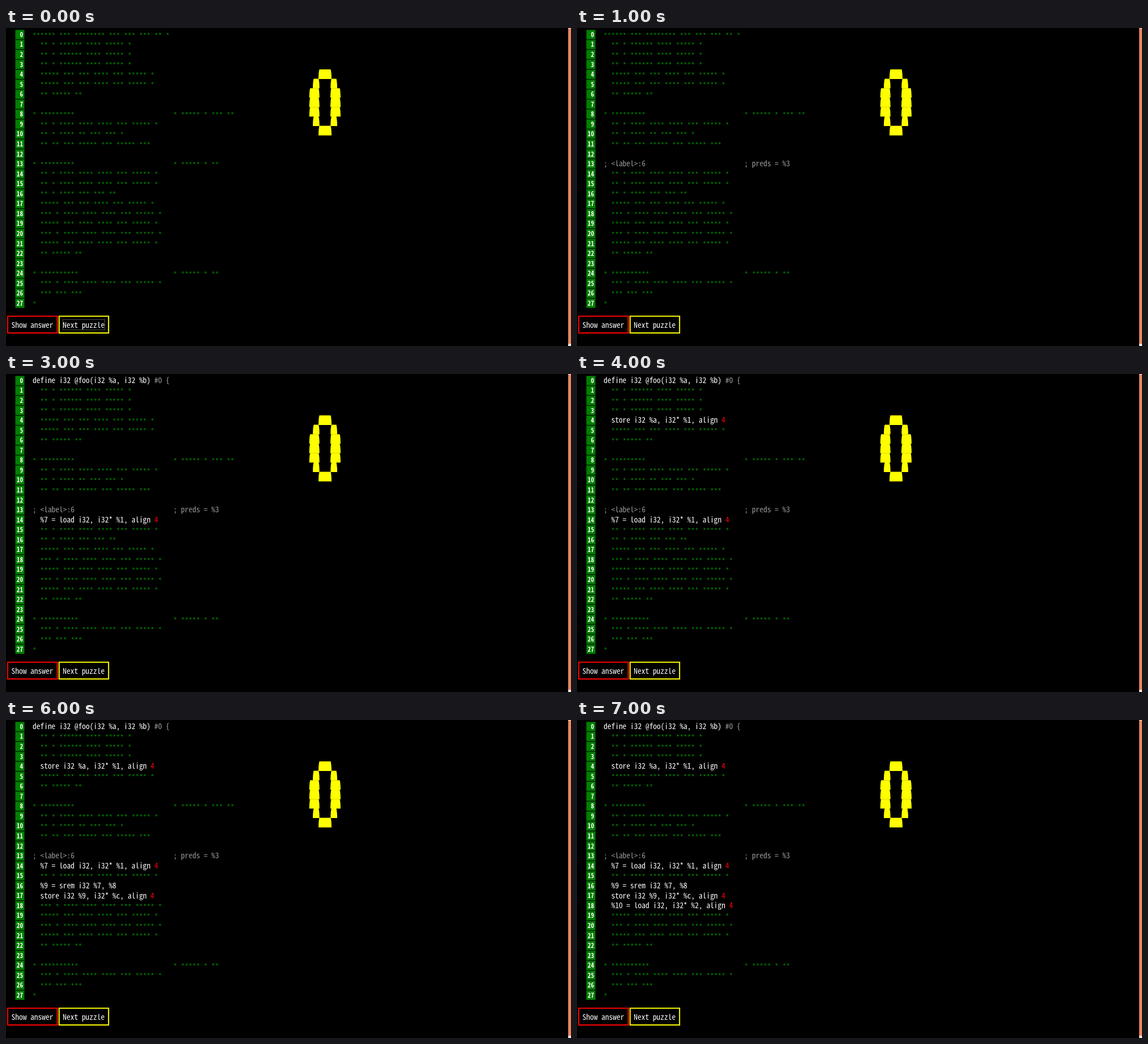
An HTML page with a canvas that plays this animation: 998 px wide and 561 px high, repeating every 8000 ms.

```html
<!DOCTYPE html>
<html lang="en">
<head>
<meta charset="utf-8">
<style>
  html, body { margin: 0; height: 100%; overflow: hidden; background: #000; }
  canvas { display: block; }
</style>
</head>
<body>
<canvas width="998" height="561"></canvas>
<script>
const ctx = document.querySelector('canvas').getContext('2d');
const LOOP = 8000, LEFT = 47, PITCH = 6.72, ROW = 17.556, FIRST = 11.5;
const FAMILY = '"Noto Sans Mono CJK JP", "Noto Sans Mono CJK SC", "Noto Sans Mono", monospace';

const label = (id, preds) => `; <label>:${id}`.padEnd(37) + `; preds = ${preds}`;
const load = (to, from) => `  %${to} = load i32, i32* %${from}, align 4`;
const store = (from, to) => `  store i32 %${from}, i32* %${to}, align 4`;
const alloca = name => `  %${name} = alloca i32, align 4`;

const lines = [
  'define i32 @foo(i32 %a, i32 %b) #0 {',
  alloca(1), alloca(2), alloca('c'), store('a', 1), store('b', 2), '  br label %3', '',
  label(3, '%6, %0'), load(4, 2), '  %5 = icmp ne i32 %4, 0', '  br i1 %5, label %6, label %12', '',
  label(6, '%3'), load(7, 1), load(8, 2), '  %9 = srem i32 %7, %8', store(9, 'c'),
  load(10, 2), store(10, 1), load(11, 'c'), store(11, 2), '  br label %3', '',
  label(12, '%3'), load(13, 1), '  ret i32 %13', '}'
];

// Line number -> time at which it is uncovered
const reveal = { 13: 1000, 14: 2000, 0: 3000, 4: 4000, 17: 5000, 16: 6000, 18: 7000 };

// Font size follows from the wanted character pitch
function fontFor(pitch, weight = 400) {
  ctx.font = `${weight} 100px ${FAMILY}`;
  const size = pitch / ctx.measureText('0').width * 100;
  return `${weight} ${size}px ${FAMILY}`;
}
const codeFont = fontFor(PITCH), buttonFont = fontFor(PITCH, 500), numberFont = fontFor(5.6, 700);

function text(str, x, y, color, font) {
  ctx.font = font;
  ctx.fillStyle = color;
  ctx.fillText(str, x, y);
}

function rect(x, y, w, h, color) {
  ctx.fillStyle = color;
  ctx.fillRect(x, y, w, h);
}

function outline(x, y, w, h, color, width, dash = []) {
  ctx.strokeStyle = color;
  ctx.lineWidth = width;
  ctx.setLineDash(dash);
  ctx.strokeRect(x, y, w, h);
  ctx.setLineDash([]);
}

function drawNumber(n, y) {
  rect(16, y - 8.5, 17, 17, '#008000');
  outline(16.5, y - 8.2, 16, 16.6, '#000', 1, [1.3, 1.3]);
  ctx.textAlign = 'right';
  text(n, 30, y + 4.4, '#fff', numberFont);
  ctx.textAlign = 'left';
}

function drawStars(line, y) {
  ctx.font = codeFont;
  const m = ctx.measureText('*');
  const base = y - 1.5 + (m.actualBoundingBoxAscent - m.actualBoundingBoxDescent) / 2;
  text(line.replace(/\S/g, '*'), LEFT, base, '#008000', codeFont);
}

function drawCode(line, y) {
  const tail = line.match(/#0 \{$|4$/);
  const cut = tail ? tail.index : line.length;
  text(line.slice(0, cut), LEFT, y + 4.7, line[0] === ';' ? '#999' : '#fff', codeFont);
  if (tail) text(tail[0], LEFT + cut * PITCH, y + 4.7, tail[0] === '4' ? '#f00' : '#aaa', codeFont);
}

function drawBlock(x, y, w) {
  ctx.beginPath();
  ctx.moveTo(x + 1.5, y);
  ctx.quadraticCurveTo(x, y + 6, x, y + 16.9);
  ctx.lineTo(x + w, y + 16.9);
  ctx.quadraticCurveTo(x + w, y + 6, x + w - 1.5, y);
  ctx.fill();
}

function drawScore() {
  const cap = [[552, 23]], bend = [[542, 11.7], [573.3, 11.7]], side = [[535.7, 18], [573, 18]];
  ctx.fillStyle = '#ff0';
  [cap, bend, side, side, side, bend, cap].forEach((blocks, row) =>
    blocks.forEach(([x, w]) => drawBlock(x, 73 + row * 16.6, w)));
}

function draw(t) {
  rect(0, 0, 998, 561, '#000');
  lines.forEach((line, i) => {
    const y = FIRST + i * ROW;
    drawNumber(i, y);
    (t >= reveal[i] ? drawCode : drawStars)(line, y);
  });
  drawScore();

  outline(3, 508.5, 87.5, 29.5, '#f00', 2);
  outline(93.8, 508.5, 87.4, 29.5, '#ff0', 2);
  text('Show answer', 9.5, 528.6, '#fff', buttonFont);
  text('Next puzzle', 100.3, 528.6, '#fff', buttonFont);
  if (t < 1000) outline(100.5, 514.5, 74, 18, '#999', 1, [1, 1]);

  rect(993, 0, 5, 561, '#f0e9e2');
  rect(993, 1, 5, 556, '#e9865f');
}

function frame() {
  draw(performance.now() % LOOP);
  requestAnimationFrame(frame);
}
frame();
</script>
</body>
</html>
```
